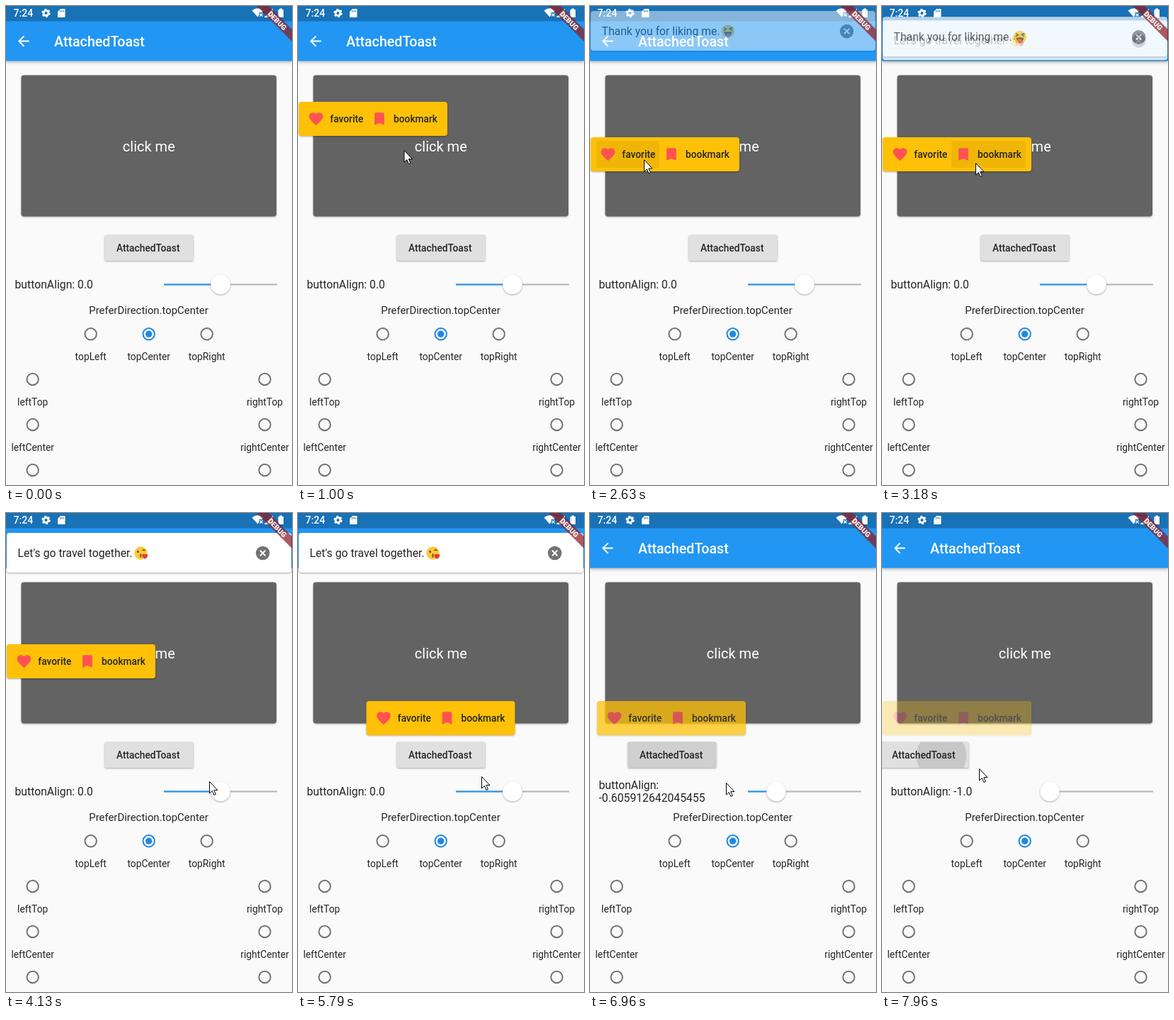
Write an HTML page that moves like this. It is 404 by 675 pixels and loops after 7.99 s.

```html
<!DOCTYPE html>
<html lang="en">
<head>
<meta charset="utf-8">
<title>AttachedToast</title>
<style>
  html, body { margin: 0; width: 100%; height: 100%; overflow: hidden; background: #fafafa; }
  svg { display: block; }
  text { font: 13.85px Roboto, sans-serif; fill: #252525; white-space: pre; }
  .mid { text-anchor: middle; }
  .bold { font-weight: 500; font-size: 13.75px; }
  .title { font-weight: 500; font-size: 19.64px; fill: #fff; }
  .body { font-size: 15.75px; }
  .low { filter: drop-shadow(0 1px 1px rgba(0, 0, 0, .32)); }
  .bar { filter: drop-shadow(0 2px 2px rgba(0, 0, 0, .28)); }
  .radio { fill: none; stroke: #737373; stroke-width: 2; }
  .on { stroke: #1e88e5; }
</style>
</head>
<body>
<svg width="404" height="675" viewBox="0 0 404 675">
  <defs>
    <path id="heart" d="M12 21.35l-1.45-1.32C5.4 15.36 2 12.28 2 8.5 2 5.42 4.42 3 7.5 3c1.74 0 3.41.81 4.5 2.09C13.09 3.81 14.76 3 16.5 3 19.58 3 22 5.42 22 8.5c0 3.78-3.4 6.86-8.55 11.54z"/>
    <path id="mark" d="M17 3H7c-1.1 0-2 .9-2 2v16l7-3 7 3V5c0-1.1-.9-2-2-2z"/>
    <g id="face">
      <circle r="9.2" fill="#ffca36"/>
      <path d="M2-3.5q2-2 4 0" fill="none" stroke="#5d4037" stroke-width="1.4"/>
    </g>
    <g id="kiss">
      <use href="#face"/>
      <circle cx="-4" cy="-2" r="1.5" fill="#5d4037"/>
      <path d="M-1 1q3 1 0 2.5q3 1 0 2.500" fill="none" stroke="#5d4037" stroke-width="1.2"/>
      <use href="#heart" transform="translate(1 0) scale(.4)" fill="#e53935"/>
    </g>
    <g id="tongue">
      <use href="#face"/>
      <path d="M-6-5l3.500 2-3.500 2M6-5l-3.500 2 3.500 2" fill="none" stroke="#5d4037" stroke-width="1.3"/>
      <path d="M-5.500 1h11q-1 6-5.500 6t-5.500-6z" fill="#5d4037"/>
      <path d="M-2.500 3h5v3.500q-2.500 4-5 0z" fill="#f0526b"/>
    </g>
    <clipPath id="buttonClip"><rect x="139.500" y="322.500" width="125" height="36.500" rx="2"/></clipPath>
  </defs>

  <rect width="404" height="675" fill="#fafafa"/>
  <rect class="bar" width="404" height="77.500" fill="#2196f3"/>
  <rect width="404" height="21.500" fill="#1971b6"/>
  <path d="M20 11H7.830l5.590-5.590L12 4l-8 8 8 8 1.410-1.410L7.830 13H20z" transform="translate(13 37.800) scale(.982)" fill="#fff"/>
  <text class="title" x="68" y="57">AttachedToast</text>

  <rect class="low" x="21.500" y="97.500" width="360.500" height="199" rx="4" fill="#636363"/>
  <text class="mid" x="201.800" y="205" style="font-size:20px;fill:#fff">click me</text>

  <g id="button">
    <rect class="low" x="139.500" y="322.500" width="125" height="36.500" rx="2" fill="#e0e0e0"/>
    <g clip-path="url(#buttonClip)"><circle id="ripple" cy="342"/></g>
    <text class="bold mid" x="200.700" y="346">AttachedToast</text>
  </g>

  <text class="body" id="align" x="12.500" y="398"></text>
  <text class="body" id="digits" x="12.500" y="407"></text>
  <path d="M223 392.500H383" stroke="#b4b4b4" stroke-width="2"/>
  <path id="active" stroke="#2196f3" stroke-width="2"/>
  <circle class="low" id="thumb" cy="392.500" r="13.800" fill="#fff"/>

  <text class="mid" x="201.500" y="434" style="font-size:14.900px">PreferDirection.topCenter</text>
  <g id="radios"></g>
  <g id="popups"></g>
  <g id="notices"></g>

  <g fill="#fff">
    <text class="bold" x="10.500" y="15" style="fill:#fff;font-size:14px">7:24</text>
    <circle cx="56.500" cy="10" r="3.500" fill="none" stroke="#fff" stroke-width="2.800"/>
    <circle cx="56.500" cy="10" r="5.300" fill="none" stroke="#fff" stroke-width="1.800" stroke-dasharray="2.775"/>
    <path d="M77 4h5.500q1 0 1 1v10q0 1-1 1h-8.500q-1 0-1-1V8z"/>
    <path d="M76.500 6v2.500M78.800 6v2.500M81 6v2.500" stroke="#1971b6"/>
    <path d="M347.500 6.500q8-6.500 16 0l-2 2.500h-4v4l-2 2.500z"/>
    <path d="M358.500 10.500l4 4m0-4l-4 4" stroke="#fff" stroke-width="1.300"/>
    <path d="M377 3.500v12.500h-12.500z"/>
    <path d="M384.500 5h2V3.500h3.500V5h2v11h-7.500z"/>
  </g>
  <g transform="translate(383.300 20.700) rotate(45)">
    <rect x="-45" y="-6" width="90" height="12" fill="#8f1d22" opacity=".72"/>
    <text class="mid" y="3.700" style="font-size:10.200px;font-weight:900;fill:#fff">DEBUG</text>
  </g>
  <path id="cursor" d="M.500.500V17l3.800-3.500 2.600 6 2.500-1.100-2.600-5.800H12z" fill="#fff" stroke="#000"/>
</svg>

<script>
const LOOP = 7990, FADE = 256;
const $ = id => document.getElementById(id);
const clamp = v => Math.min(1, Math.max(0, v));
const smooth = v => v * v * (3 - 2 * v);
const decelerate = v => 1 - (1 - v) ** 2;
const presence = (t, from, to) => Math.min(clamp((t - from) / FADE), 1 - clamp((t - to) / FADE));

// time, x, y of the pointer tip
const route = [
  [20, 312, 676], [440, 90, 187], [860, 90, 187], [1250, 290, 241], [1370, 290, 241],
  [1740, 95, 238], [1805, 95, 238], [1960, 154, 253], [2080, 160, 257], [2440, 72, 216],
  [2580, 72, 216], [2900, 132, 221], [3200, 132, 221], [4130, 287, 378], [4230, 288, 396],
  [4540, 215, 342], [4640, 215, 342], [4930, 262, 295], [5060, 262, 295], [5480, 255, 386],
  [5790, 259, 371], [6000, 303, 389], [6060, 303, 389], [6480, 263, 390], [6530, 263, 390],
  [6720, 118, 345], [6780, 118, 345], [6960, 192, 380], [7120, 263, 388], [7180, 263, 388],
  [7480, 237, 388], [7530, 235, 388], [7790, 84, 342], [7870, 84, 342], [7960, 137, 360], [LOOP, 144, 362]
];

const popups = [
  { x: 1, y: 135, from: 500, to: 1290 },
  { x: 185.5, y: 189, from: 1290, to: 1805 },
  { x: 1, y: 185, from: 1805, to: 4600, presses: [2560, 3037] },
  { x: 96.5, y: 265, from: 4610, to: 6060, presses: [-LOOP, 5000] },
  { x: 10, y: 265, from: 6768, to: 7180 },
  { x: 1, y: 265, from: 7888, to: 2 * LOOP }
];

const thanks = ["Thank you for liking me.", "tongue", 195];
const travel = ["Let's go travel together.", "kiss", 190.5];
const notices = [
  { content: thanks, from: 2560, to: 3037 },
  { content: travel, from: 3037, to: 5010 },
  { content: travel, from: 5010, to: 6500 }
];

// press time and x on the button
const taps = [[4590, 215], [6720, 118], [7850, 84]];
const MIDWAY = -0.605912642045455;

function group(parent, html, first) {
  const g = document.createElementNS("http://www.w3.org/2000/svg", "g");
  g.innerHTML = html;
  first ? parent.prepend(g) : parent.append(g);
  return g;
}

const radio = (x, y, label, on) => `
  <circle class="radio ${on ? "on" : ""}" cx="${x}" cy="${y}" r="8.2"/>
  ${on ? `<circle cx="${x}" cy="${y}" r="4.7" fill="#1e88e5"/>` : ""}
  <text class="mid" x="${x}" y="${y + 37}">${label}</text>`;
$("radios").innerHTML =
  ["topLeft", "topCenter", "topRight"].map((s, i) => radio(119.7 + 82 * i, 462.3, s, i === 1)).join("") +
  ["Top", "Center", "Bottom"].map((s, i) =>
    radio(37.7, 526 + 64 * i, "left" + s) + radio(365.5, 526 + 64 * i, "right" + s)).join("");

for (const p of popups) {
  p.el = group($("popups"), `
    <rect class="low" width="210" height="48" rx="4" fill="#ffc107"/>
    <rect class="press" x="8" y="5" width="89" height="38" rx="2"/>
    <rect class="press" x="97" y="5" width="105" height="38" rx="2"/>
    <use href="#heart" transform="translate(12.7 12.2) scale(.982)" fill="#ff5252"/>
    <text class="bold" x="44.300" y="29">favorite</text>
    <use href="#mark" transform="translate(102.200 12.200) scale(.982)" fill="#ff5252"/>
    <text class="bold" x="134" y="29">bookmark</text>`);
  p.el.setAttribute("transform", `translate(${p.x} ${p.y})`);
  p.marks = p.el.querySelectorAll(".press");
}

// a leaving notice stays above the one that replaces it
for (const n of notices) {
  const [text, emoji, x] = n.content;
  n.el = group($("notices"), `
    <rect class="low" x="1" y="28" width="402" height="56" rx="4" fill="#fff"/>
    <text class="body" x="16.500" y="62">${text}</text>
    <use href="#${emoji}" x="${x}" y="56.500"/>
    <circle cx="362.700" cy="56.500" r="9.800" fill="#737373"/>
    <path d="M359 52.800l7.400 7.400m0-7.400l-7.400 7.400" stroke="#fff" stroke-width="2"/>`, true);
}

function pointerAt(t) {
  const i = Math.max(1, route.findIndex(p => p[0] > t));
  const [t0, x0, y0] = route[i - 1], [t1, x1, y1] = route[i];
  const k = smooth(clamp((t - t0) / (t1 - t0)));
  return [x0 + (x1 - x0) * k, y0 + (y1 - y0) * k];
}

function sliderAt(t) {
  if (t < 7180) return MIDWAY * smooth(clamp((t - 6060) / 420));
  return MIDWAY + (-1 - MIDWAY) * smooth(clamp((t - 7180) / 300));
}

function drawSlider(value) {
  const x = 303 + 66 * value;
  const short = Number.isInteger(value);
  $("thumb").setAttribute("cx", x);
  $("active").setAttribute("d", `M223 392.5H${x}`);
  $("button").setAttribute("transform", `translate(${142 * value} 0)`);
  $("align").setAttribute("y", short ? 398 : 388.5);
  $("align").textContent = "buttonAlign:" + (short ? " " + value.toFixed(1).replace("-0.0", "0.0") : "");
  $("digits").textContent = short ? "" : value.toPrecision(15);
}

function drawRipple(t, value) {
  const tap = taps.find(([at]) => t >= at && t < at + 450);
  const age = tap ? t - tap[0] : 0;
  $("ripple").setAttribute("cx", tap ? tap[1] - 142 * value : 0);
  $("ripple").setAttribute("r", age * .32);
  $("ripple").setAttribute("opacity", tap ? .115 * (1 - clamp((age - 150) / 300)) : 0);
}

function draw(t) {
  const [x, y] = pointerAt(t);
  const value = sliderAt(t);
  $("cursor").setAttribute("transform", `translate(${x} ${y})`);
  $("cursor").setAttribute("visibility", t < 20 ? "hidden" : "visible");
  drawSlider(value);
  drawRipple(t, value);
  for (const p of popups) {
    p.el.setAttribute("opacity", presence(t, p.from, p.to));
    p.marks.forEach((mark, i) => {
      const age = t - (p.presses ? p.presses[i] : LOOP);
      mark.setAttribute("opacity", age < 0 ? 0 : .06 * clamp(age / 60) * (1 - clamp((age - 180) / 200)));
    });
  }
  for (const n of notices) {
    const v = decelerate(presence(t, n.from, n.to));
    n.el.setAttribute("opacity", v);
    n.el.setAttribute("transform", `translate(0 ${-40 * (1 - v)})`);
  }
}

const start = performance.now();
function tick() {
  draw((performance.now() - start) % LOOP);
  requestAnimationFrame(tick);
}
tick();
</script>
</body>
</html>
```
